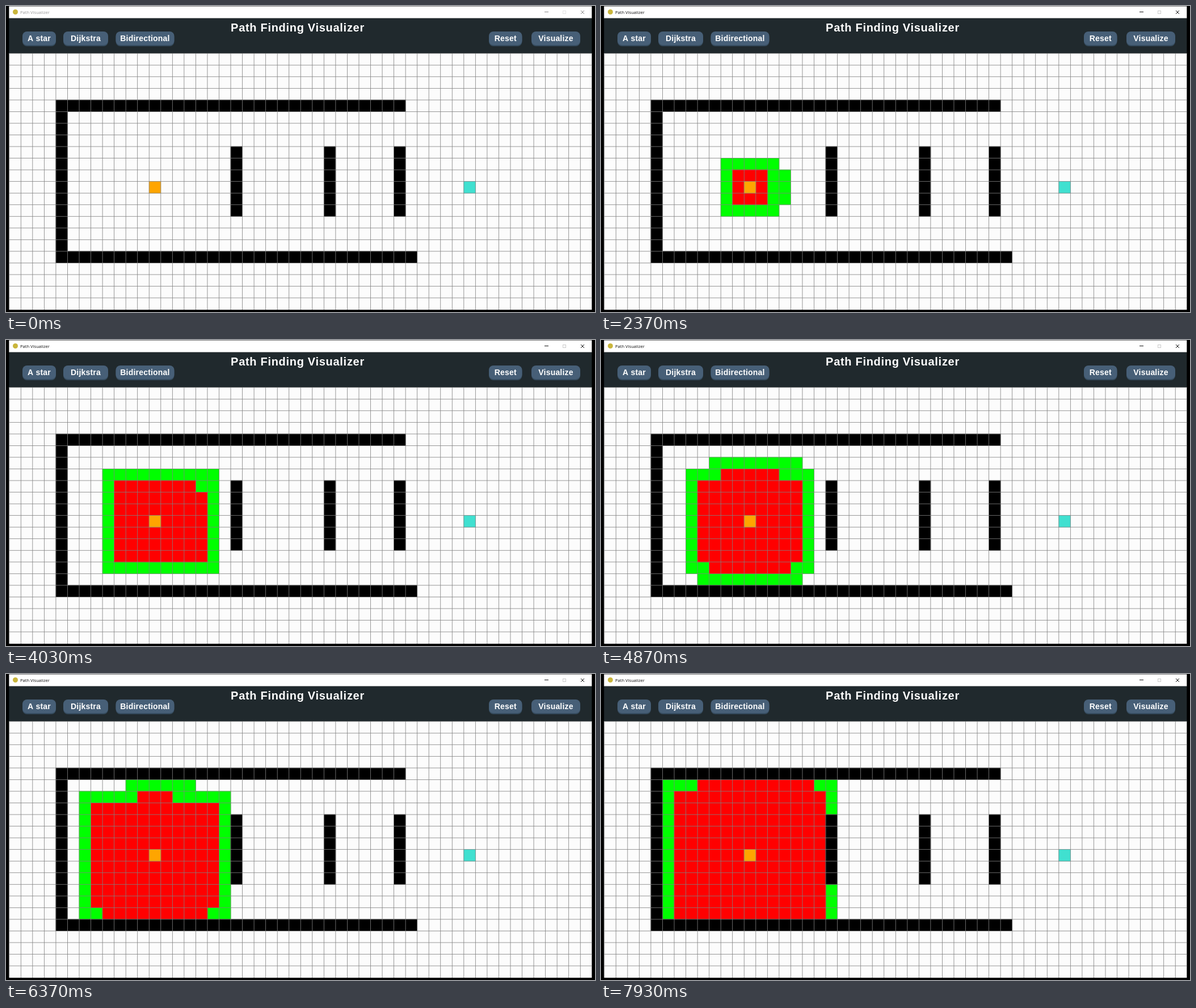
Recreate the animation shown at these times as an HTML page with a canvas. Size 1038x540 px, loop 8 s.

```html
<!DOCTYPE html>
<html lang="en">
<head>
<meta charset="utf-8">
<title>Path Visualizer</title>
<style>
  html, body { margin: 0; width: 100%; height: 100%; overflow: hidden; background: #000; }
  canvas { display: block; }
</style>
</head>
<body>
<canvas id="stage" width="1038" height="540"></canvas>
<script>
const ctx = document.getElementById('stage').getContext('2d');
const LOOP = 8000, COLS = 50, ROWS = 22, RUN = 2010;
const START = [12, 11], GOAL = [39, 11];

// The window is a scaled-down screen: 25 px cells and 1 px lines at this scale.
const SCALE = 0.8216, CELL = 25 * SCALE;
const LEFT = 5.35, WIDTH = COLS * CELL, TOP = 83.3, HEIGHT = 452.7, BAR = 21.7;
const colX = c => LEFT + CELL * c;
const rowY = r => TOP + CELL * r;
const key = (c, r) => r * COLS + c;

// Walls as inclusive cell ranges: c0, r0, c1, r1
const WALLS = [
  [4, 4, 33, 4], [4, 5, 4, 17], [5, 17, 34, 17],
  [19, 8, 19, 13], [27, 8, 27, 13], [33, 8, 33, 13]
];
const isWall = (c, r) => WALLS.some(([a, b, d, e]) => c >= a && c <= d && r >= b && r <= e);

// Unit-cost search over eight neighbours; each node remembers which step opened it.
const DIRS = [[1, 0], [-1, 0], [0, 1], [0, -1], [1, 1], [1, -1], [-1, 1], [-1, -1]];
function search(limit) {
  const queue = [{ c: START[0], r: START[1], openedAt: 0 }];
  const seen = new Set([key(...START)]);
  for (let i = 0; i < limit; i++) {
    for (const [dx, dy] of DIRS) {
      const c = queue[i].c + dx, r = queue[i].r + dy;
      if (c < 0 || r < 0 || c >= COLS || r >= ROWS || isWall(c, r) || seen.has(key(c, r))) continue;
      seen.add(key(c, r));
      queue.push({ c, r, openedAt: i });
    }
  }
  return queue;
}
const nodes = search(160);

// Time to search step, with short rests
const PACE = [
  [RUN, 0], [2370, 9.2], [2430, 9.9], [4030, 55.2], [4100, 55.9], [4870, 75.2],
  [4930, 75.9], [6370, 111.2], [6400, 111.9], [7930, 153.2], [8000, 153.9]
];
function stepAt(t) {
  if (t < RUN) return -1;
  const i = PACE.findIndex(p => p[0] > t);
  const [t0, a] = PACE[i - 1], [t1, b] = PACE[i];
  return Math.floor(a + (b - a) * (t - t0) / (t1 - t0));
}

const BUTTONS = [
  ['A star', 29, 59], ['Dijkstra', 101, 79], ['Bidirectional', 193.5, 103],
  ['Reset', 851, 58.5], ['Visualize', 926, 86]
];
const FOCUS = 700;
const PRESSES = [[950, 1225], [1790, 1960]];

const smooth = u => u * u * (3 - 2 * u);
function cursorAt(t) {
  if (t < 75 || t >= RUN) return null;
  if (t < 680) {
    const s = smooth((t - 75) / 605);
    return [620 - 480 * s, 545 - 484 * s];
  }
  if (t < 1090) return [140 + 8 * (t - 680) / 410, 61 + (t - 680) / 410];
  const u = Math.min(1, (t - 1090) / 560), s = smooth(u);
  return [148 + 818 * s, 62 - 2 * s + 9 * Math.sin(Math.PI * u)];
}

function rect(x, y, w, h, color) {
  ctx.fillStyle = color;
  ctx.fillRect(x, y, w, h);
}
function text(str, x, y, font, color, align = 'center', spacing = 0) {
  ctx.font = font;
  ctx.fillStyle = color;
  ctx.textAlign = align;
  ctx.letterSpacing = spacing + 'px';
  ctx.fillText(str, x, y);
}
function pill(x, y, w, h, color) {
  ctx.fillStyle = color;
  ctx.beginPath();
  ctx.roundRect(x, y, w, h, 8);
  ctx.fill();
}
// Fills reach under the closing grid line so that neighbours leave no seam.
function cells(c0, r0, c1, r1, color) {
  rect(colX(c0), rowY(r0), (c1 - c0 + 1) * CELL + SCALE, (r1 - r0 + 1) * CELL + SCALE, color);
}
const cell = (c, r, color) => cells(c, r, c, r, color);

function drawTitleBar(active) {
  rect(LEFT, 0.5, WIDTH, BAR - 0.5, '#fff');
  ctx.fillStyle = '#c9b53c';
  ctx.beginPath();
  ctx.arc(16.5, 10.5, 4.5, 0, 7);
  ctx.fill();
  text('Path Visualizer', 25, 13.5, '7.6px "Open Sans", sans-serif', active ? '#111' : '#999', 'left');
  const ink = active ? '#111' : '#888';
  rect(949, 10, 7, 1, ink);
  ctx.lineWidth = 1;
  ctx.strokeStyle = active ? '#ccc' : '#e4e4e4';
  ctx.strokeRect(981.5, 8.5, 5, 5);
  ctx.strokeStyle = ink;
  ctx.beginPath();
  ctx.moveTo(1013, 8); ctx.lineTo(1019, 14);
  ctx.moveTo(1019, 8); ctx.lineTo(1013, 14);
  ctx.stroke();
}

function drawHeader(t) {
  rect(LEFT, BAR, WIDTH, TOP - BAR, '#20292d');
  text('Path Finding Visualizer', 514, 44.5, 'bold 20px "Liberation Sans", Arial, sans-serif', '#fff', 'center', 0.7);
  // Buttons react a little later than the pointer moves.
  const pointer = cursorAt(t - 60);
  const down = PRESSES.some(([a, b]) => t >= a && t < b);
  for (const [label, x, w] of BUTTONS) {
    const hover = t < RUN && pointer && pointer[0] >= x && pointer[0] <= x + w &&
      pointer[1] >= 45 && pointer[1] <= 71;
    const dy = hover && down ? 2 : 0;
    if (!dy) pill(x, 47, w, 24, '#354b5e');
    pill(x, 45 + dy, w, 24, hover ? '#d74b4b' : '#475f77');
    text(label, x + w / 2, 61.5 + dy, 'bold 14px "Liberation Sans", Arial, sans-serif', '#fff', 'center', 0.2);
  }
}

function drawGrid(step) {
  rect(LEFT, TOP, WIDTH, HEIGHT, '#fcfcfc');
  nodes.forEach((n, i) => {
    if (i >= step && n.openedAt <= step) cell(n.c, n.r, '#0f0');
  });
  nodes.slice(0, Math.max(0, step)).forEach(n => cell(n.c, n.r, '#f00'));
  WALLS.forEach(w => cells(...w, '#000'));
  cell(...START, '#ffa500');
  cell(...GOAL, '#40e0d0');
  for (let c = 0; c < COLS; c++) rect(colX(c), TOP, SCALE, HEIGHT, '#808080');
  for (let r = 0; r < ROWS; r++) rect(LEFT, rowY(r), WIDTH, SCALE, '#808080');
}

const ARROW = new Path2D('M0 0V11.2L2.6 8.8L4.3 12.8L6.2 12L4.5 8.1H8Z');
function drawCursor(pos) {
  if (!pos) return;
  ctx.save();
  ctx.translate(...pos);
  ctx.fillStyle = '#fff';
  ctx.strokeStyle = '#000';
  ctx.lineWidth = 0.8;
  ctx.fill(ARROW);
  ctx.stroke(ARROW);
  ctx.restore();
}

function draw(t) {
  const held = 1170 + Math.floor((t - 1170) / 55) * 55;
  rect(0, 0, 1038, 540, '#000');
  drawTitleBar(t >= FOCUS);
  drawGrid(stepAt(t));
  drawHeader(held);
  drawCursor(cursorAt(held));
}

const begin = performance.now();
function tick() {
  draw((performance.now() - begin) % LOOP);
  requestAnimationFrame(tick);
}
tick();
</script>
</body>
</html>
```
